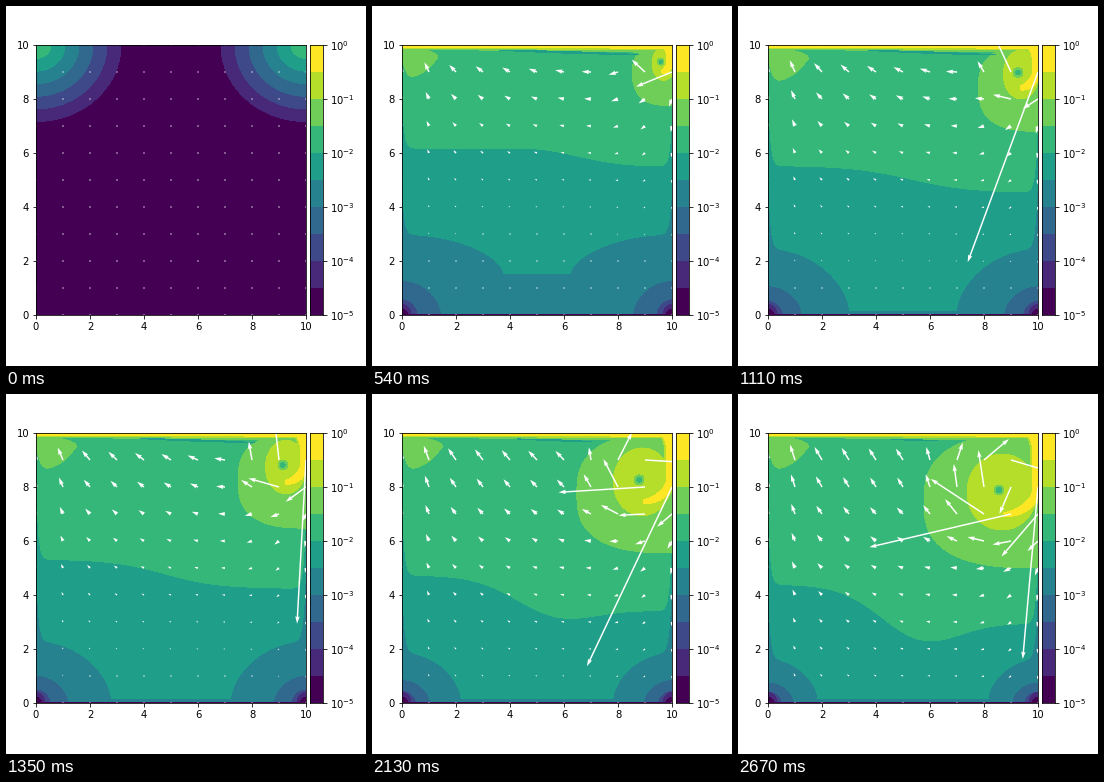
A matplotlib script for the animation above (2.7 s loop, 360x360 px).

```python
import numpy as np
import matplotlib.pyplot as plt
from matplotlib.animation import FuncAnimation

# Lid-driven cavity: banded speed field and velocity arrows, in stage pixels.
FRAMES, STEP_MS = 90, 30
FILLED = 8  # frame at which the flow has reached the whole cavity
L, R, T, B = 30, 300, 39, 309
COLORS = plt.get_cmap("viridis")(np.linspace(0, 1, 10))
XS = np.linspace(L, R, 541)
WALL = np.minimum(XS - L, R - XS)  # distance to the nearer side wall
SPREAD = .45  # easing power of the slow descent of the bands

# Slow fluid in the bottom corners, per band: top and width, first and last.
MOUNDS = {
    1: (302, 302, 7, 7),
    2: (297, 297, 10, 10),
    3: (290, 297, 17, 14),
    4: (266, 288, 48, 26),
    5: (205, 265, 135, 50),
}
LEFT_PATCH = [(31, 58), (36, 71), (43, 74), (56, 68), (67, 57), (70, 51),
              (61, 46), (45, 43)]


def ramp(k, start, length):
    return float(np.clip((k - start) / length, 0, 1))


def late(k):
    return ramp(k, FILLED, FRAMES - 1 - FILLED)


def lerp(a, b, u):
    return a + (b - a) * u


def spline(pts, n=8):
    """Catmull-Rom curve through open points."""
    p = np.vstack([pts[:1], pts, pts[-1:]])
    u = np.linspace(0, 1, n)[:, None]
    out = []
    for a, b, c, d in zip(p, p[1:], p[2:], p[3:]):
        out.append(b + u * ((c - a) / 2 + u * (a - 2.5 * b + 2 * c - d / 2
                                               + u * (1.5 * (b - c) + (d - a) / 2))))
    return np.vstack(out)


def mound_border(i, k):
    h0, h1, w0, w1 = MOUNDS[i]
    e = late(k) ** SPREAD
    base = lerp(218, 305, ramp(k, FILLED, 20) ** .8) if i == 5 else 308
    q = np.minimum(WALL / lerp(w0, w1, e), 1)
    return base - (base - lerp(h0, h1, e)) * (1 - q ** 2) ** .6


def wave_border(k):
    """Border of the fast upper half: a step down to the right plus a bulge."""
    s = late(k)
    bulge = 53 * max(0, s - .4) - 33 * np.exp(-max(0, k - FILLED) / 7)
    step = 1 / (1 + np.exp((170 - XS) / 30))
    return (lerp(121, 190, s ** .57) + lerp(5, 40, s ** SPREAD) * step
            + bulge * np.exp(-((XS - 178) / 55) ** 2))


def border(i, k):
    y = wave_border(k) if i == 6 else mound_border(i, k)
    if i >= 5:
        y = y - lerp(20, 90, ramp(k, FILLED, 20)) * np.exp(-WALL / 2.2)
    if k < FILLED:
        # Bands first spread as arcs from the two top corners.
        grow = k / FILLED
        r = lerp(15 + 14 * (6 - i), np.hypot(135, y.max() - T), grow ** .5)
        arc = np.sqrt(np.maximum(r * r - WALL ** 2, 0))
        y = np.minimum(y, T + lerp(.9, 1, grow) * arc)
    return np.vstack([np.column_stack([XS, y]), [(R, T), (L, T)]])


def eye_at(k):
    s = late(k)
    return lerp(295, 261, s ** .8), lerp(50, 96, s)


def hook_size(k):
    """Radii of the jet's curl around the eye."""
    return 297.5 - eye_at(k)[0], lerp(5, 25, late(k) ** .6)


def left_patch(k):
    corner = np.array([L, T])
    size = .78 * np.sqrt(ramp(k, 0, FILLED)) + .22 * ramp(k, FILLED, 20)
    pts = corner + (np.array(LEFT_PATCH) - corner) * size
    return np.vstack([spline(pts), [corner]])


def outer(k):
    """Half superellipse against the right wall, reaching up to the lid."""
    s, grow = late(k), np.sqrt(ramp(k, 0, FILLED))
    cy, bottom = lerp(46, 108, s ** .55), lerp(74, 174, s ** .65)
    a = np.linspace(-np.pi / 2, np.pi / 2, 60)
    p = 2 / 2.7
    x = R - lerp(29, 114, s) * np.cos(a) ** p
    y = np.sign(a) * np.abs(np.sin(a)) ** p
    y = cy + np.where(a < 0, cy - T, bottom - cy) * y
    return np.column_stack([R + (x - R) * grow, T + (y - T) * grow])


def ellipse(cx, cy, rx, ry):
    a = np.linspace(0, 2 * np.pi, 60)
    return np.column_stack([cx + rx * np.cos(a), cy + ry * np.sin(a)])


def inner(k):
    (ex, ey), s, grow = eye_at(k), late(k), ramp(k, 0, FILLED)
    return ellipse(ex + 3, ey + 2, lerp(8, 35, s) * grow,
                   lerp(8, 38, s ** .6) * grow)


def eye(r, k):
    return ellipse(*eye_at(k), *[r * ramp(k, 4, 20)] * 2)


def jet(extra, k):
    """Ribbon down the right wall, curling in below the eye."""
    (ex, ey), (rx, ry) = eye_at(k), hook_size(k)
    grow = np.sqrt(ramp(k, 0, FILLED))
    a = np.radians(np.linspace(0, 82, 30))
    down = np.linspace(T, ey, 30, endpoint=False)
    x = np.r_[np.full(30, ex + rx), ex + rx * np.cos(a)]
    y = np.r_[down, ey + ry * np.sin(a)]
    half = np.r_[3 + 9 * np.exp((T - down) / 4),
                 3 + 1.5 * np.sin(2 * a) - 1.5 * a / a[-1]]
    half = (half * lerp(.6, 1, ramp(k, FILLED, 20)) + extra) * grow
    y = T + (y - T) * grow
    dx, dy = np.gradient(x), np.gradient(y)
    norm = np.hypot(dx, dy) + 1e-9
    nx, ny = -dy / norm * half, dx / norm * half
    return np.column_stack([np.r_[x + nx, (x - nx)[::-1]],
                            np.r_[y + ny, (y - ny)[::-1]]])


def lid(y0, y1, k):
    if k == 0:
        y0 = y1 = T
    return [(L, T), (R, T), (R, y1), (L, y0)]


def sliver(k):
    """Thin line of still fluid under the lid."""
    s, wide = late(k), ramp(k, 4, 16)
    x0, x1 = lerp(165, 118 + 35 * s, wide), lerp(180, 290 - 90 * s, wide)
    x = np.linspace(x0, x1, 40)
    y = 44 + .035 * (x - 118) * wide
    d = (.9 - .5 * s) * ramp(k, 0, FILLED) * np.sin(np.linspace(0, np.pi, 40))
    return np.column_stack([np.r_[x, x[::-1]], np.r_[y - d, (y + d)[::-1]]])


GX, GY = np.meshgrid(np.linspace(L, R, 11), np.linspace(B, T, 11))
COL, ROW = np.meshgrid(np.arange(11), np.arange(11))


def far_flow(k):
    """Broad circulation; complex numbers are right + up*1j."""
    s = late(k)
    size = lerp(6, 13.5, s ** SPREAD) * np.exp((ROW - 9) * lerp(.33, .2, s))
    size = size * (1 + .2 * ((COL - 5) / 4) ** 2) * np.where(COL == 0, .5, 1)
    angle = np.interp(COL, [0, 1, 2, 5, 7, 9, 10], [88, 65, 46, 22, 2, -38, -78])
    lift = np.clip((ROW - 5) / 3, 0, 1) * ramp(k, 28, 61)
    angle = angle + 7 * COL * lift * (COL <= 6)
    return -size * np.exp(-1j * np.radians(angle))


def vortex_flow(k):
    """Clockwise swirl plus the jet; returns velocity and its share."""
    s, (ex, ey), (rx, ry) = late(k), eye_at(k), hook_size(k)
    dx, dy = GX - 5 - ex, GY + 6 - ey
    r = np.hypot(dx, dy) + 1e-6
    swirl = 1500 * lerp(.4, 1, s) * r / (r ** 2 + lerp(8, 20, s) ** 2)
    rho, phi = np.hypot(dx / rx, dy / ry), np.arctan2(dy / ry, dx / rx)
    stream = (190 * np.exp(-((rho - 1) / .4) ** 2)
              * np.maximum(np.cos(phi - np.pi / 4), 0))
    share = np.exp(-(r / lerp(30, 75, s)) ** 4)
    return (swirl + stream) * (-dy - 1j * dx) / r, share


def arrows(k):
    swirl, share = vortex_flow(k)
    z = far_flow(k) * (1 - share) + swirl * share
    z[[0, -1]] = 0
    return z * ramp(k, 0, FILLED)


LAYERS = [(i, lambda k, i=i: border(i, k)) for i in range(1, 7)] + [
    (7, left_patch),
    (7, outer),
    (7, lambda k: lid(43, 46.5, k)),
    (5, sliver),
    (8, inner),
    (8, lambda k: jet(2, k)),
    (8, lambda k: lid(42, 44, k)),
    (9, lambda k: jet(0, k)),
    (9, lambda k: lid(41, 42.3, k)),
    (7, lambda k: eye(4.8, k)),
    (6, lambda k: eye(2.3, k)),
]

plt.rcParams.update({"font.family": "DejaVu Sans", "font.size": 10})
fig = plt.figure(figsize=(5, 5), dpi=72, facecolor="white")


def add_axes(x0, x1):
    return fig.add_axes([x0 / 360, 1 - B / 360, (x1 - x0) / 360, (B - T) / 360])


ax = add_axes(L, R)
ax.set_facecolor(COLORS[0])
ax.set_xlim(L, R)
ax.set_ylim(B, T)
ticks = np.arange(0, 11, 2)
ax.set_xticks(L + (R - L) * ticks / 10, [str(t) for t in ticks])
ax.set_yticks(B - (B - T) * ticks / 10, [str(t) for t in ticks])

shapes = []
for index, make in LAYERS:
    patch = plt.Polygon(make(0), closed=True, fc=COLORS[index], ec="none",
                        lw=0, antialiased=False)
    shapes.append((ax.add_patch(patch), make))

quiver = ax.quiver(GX, GY, GX * 0, GY * 0, color="white", angles="xy",
                   scale_units="xy", scale=1, units="width", width=.00545,
                   zorder=2)

bar = add_axes(303.6, 317.1)
for i, color in enumerate(COLORS):
    bar.axhspan(i, i + 1, fc=color, ec="none", lw=0, antialiased=False)
bar.set_xlim(0, 1)
bar.set_ylim(0, 10)
bar.set_xticks([])
bar.yaxis.tick_right()
bar.set_yticks(ticks, [f"$10^{{{t // 2 - 5}}}$" for t in ticks])


def update(k):
    for patch, make in shapes:
        patch.set_xy(make(k))
    z = arrows(k)
    quiver.set_UVC(z.real, -z.imag)
    return [patch for patch, _ in shapes] + [quiver]


anim = FuncAnimation(fig, update, frames=FRAMES, interval=STEP_MS,
                     init_func=lambda: update(0), repeat=True,
                     repeat_delay=0, blit=False)
plt.show()
```
